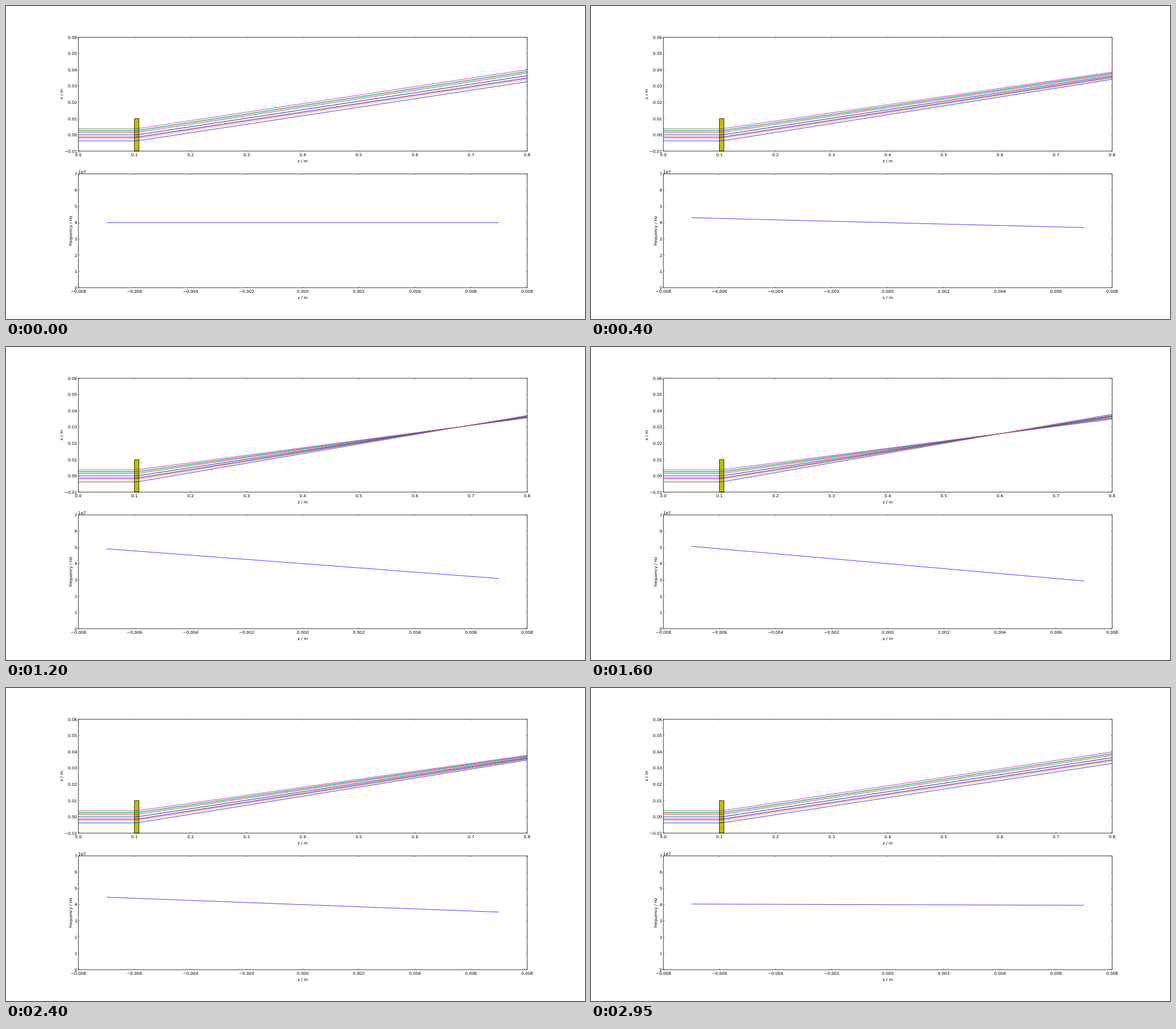
Recreate the animation shown at these times as an HTML page. Size 1017 px wide and 550 px high, loop 3000 ms.

```html
<!DOCTYPE html>
<html lang="en">
<head>
<meta charset="utf-8">
<title>Beam deflection</title>
<style>
  html, body { margin: 0; width: 100%; height: 100%; overflow: hidden; background: #fff; }
  svg { display: block; width: 100%; height: 100%; }
  text { font: 7.25px "DejaVu Sans", Verdana, sans-serif; fill: #000; }
</style>
</head>
<body>
<svg id="stage" viewBox="0 0 1017 550"></svg>
<script>
const stage = document.getElementById('stage');
const LEFT = 127.1, RIGHT = 915.3, HEIGHT = 200;
const TOP = 55, LOWER = 295, FIRST = 0.1, LAST = 0.108;
const STEP = 50, STEPS = 60;

function add(tag, attrs, label) {
  const node = document.createElementNS('http://www.w3.org/2000/svg', tag);
  for (const key in attrs) node.setAttribute(key, attrs[key]);
  if (label !== undefined) node.textContent = label;
  return stage.appendChild(node);
}

const text = (x, y, label, anchor = 'middle', extra = {}) =>
  add('text', { x, y: y + 2.65, 'text-anchor': anchor, ...extra }, label);
const line = (color, width = 0.75) =>
  add('path', { fill: 'none', stroke: color, 'stroke-width': width, 'stroke-linejoin': 'round' });
const path = points => 'M' + points.map(p => p.map(v => v.toFixed(3)).join(' ')).join('L');
const number = (v, digits) => v.toFixed(digits).replace('-', '\u2212');

const zx = z => LEFT + z / 0.8 * (RIGHT - LEFT);
const xy = x => TOP + (0.06 - x) / 0.07 * HEIGHT;
const px = x => LEFT + (x + 0.008) / 0.016 * (RIGHT - LEFT);
const fy = f => LOWER + (7 - f) / 7 * HEIGHT;

// Frame, ticks and labels of one plot
function axes(top, xLabels, yLabels, xTitle, yTitle, titleX) {
  const bottom = top + HEIGHT, width = RIGHT - LEFT;
  add('rect', { x: LEFT, y: top, width, height: HEIGHT, fill: 'none', stroke: '#000', 'stroke-width': 0.8 });
  let ticks = '';
  xLabels.forEach((label, i) => {
    const x = LEFT + i / (xLabels.length - 1) * width;
    ticks += `M${x} ${top}v2.4M${x} ${bottom}v-2.4`;
    text(x, bottom + 6.4, label);
  });
  yLabels.forEach((label, i) => {
    const y = bottom - i / (yLabels.length - 1) * HEIGHT;
    ticks += `M${LEFT} ${y}h2.4M${RIGHT} ${y}h-2.4`;
    text(LEFT - 2.1, y, label, 'end');
  });
  add('path', { d: ticks, stroke: '#000', 'stroke-width': 0.4 });
  text((LEFT + RIGHT) / 2, bottom + 17.4, xTitle);
  const mid = top + HEIGHT / 2;
  text(titleX, mid, yTitle, 'middle', { transform: `rotate(-90 ${titleX} ${mid})` });
}

const list = (n, from, step, digits) =>
  Array.from({ length: n }, (_, i) => number(from + i * step, digits));

add('rect', { width: 1017, height: 550, fill: '#fff' });
add('rect', {
  x: zx(FIRST), y: xy(0.01), width: zx(LAST) - zx(FIRST), height: xy(-0.01) - xy(0.01),
  fill: '#bfbf00', stroke: '#000', 'stroke-width': 0.8
});

// Ray height in mm, colour before and behind the crystal
const rays = [
  [-3.72, '#00f', '#00f'],
  [2.72, '#007f00', '#007f00'],
  [1.47, '#f00', '#f00'],
  [0, '#00f', '#00f'],
  [0, '#00a0a0', '#008080'],
  [2.25, '#00bfbf', '#00bfbf'],
  [-1.22, '#bf00bf', '#bf00bf'],
  [-1.72, '#bf00bf', '#800080'],
  [3.75, '#606060', '#bf00bf'],
  [-2.58, '#bfbf00', '#bfbf00']
].map(([mm, before, behind]) => ({ x: mm / 1000, inlet: line(before), outlet: line(behind) }));

for (const { x, inlet } of rays) inlet.setAttribute('d', path([[LEFT, xy(x)], [zx(FIRST), xy(x)]]));
const chirp = line('#00f');

axes(TOP, list(9, 0, 0.1, 1), list(8, -0.01, 0.01, 2), 'z / m', 'x / m', 97);
axes(LOWER, list(9, -0.008, 0.002, 3), list(8, 0, 1, 0), 'x / m', 'frequency / Hz', 113.3);
text(LEFT - 0.3, LOWER - 4, '1e7', 'start');

function draw(ms) {
  const i = Math.floor(ms / STEP) % STEPS;
  const k = Math.min(i, STEPS - i);
  for (const { x, outlet } of rays) {
    const angle = 0.0523 - x * k / (20 * 0.6956);
    const exit = x + angle / 2.2 * (LAST - FIRST);
    outlet.setAttribute('d', path([
      [zx(FIRST), xy(x)], [zx(LAST), xy(exit)], [RIGHT, xy(exit + angle * (0.8 - LAST))]
    ]));
  }
  const rise = 0.0381 * k;
  chirp.setAttribute('d', path([[px(-0.007), fy(4 + rise)], [px(0.007), fy(4 - rise)]]));
}

const start = performance.now();
function tick() {
  draw(performance.now() - start);
  requestAnimationFrame(tick);
}
draw(0);
requestAnimationFrame(tick);
</script>
</body>
</html>
```
